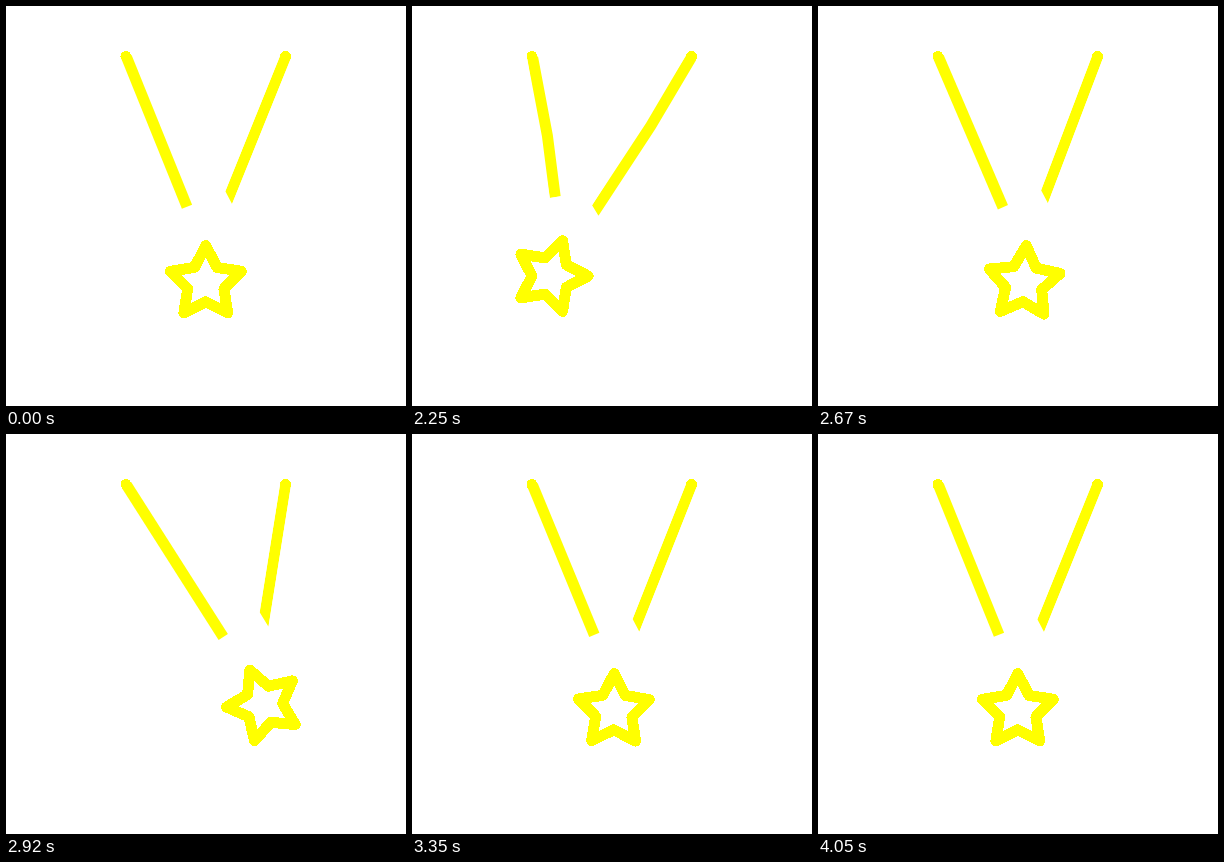
An HTML page without scripts for the animation above (4.1 s loop, 400 px wide and 400 px high).

```html
<!DOCTYPE html>
<html lang="en">
<head>
<meta charset="utf-8">
<title>Swinging medal</title>
<style>
  /* --s: sideways swing, -1 is the left peak; --r: star turn in degrees */
  @property --s { syntax: "<number>"; inherits: true; initial-value: 0; }
  @property --r { syntax: "<number>"; inherits: true; initial-value: 0; }

  html, body { margin: 0; width: 100%; height: 100%; overflow: hidden; background: #fff; }

  .stage {
    position: relative;
    width: 400px;
    height: 400px;
    animation: swing 4.1s cubic-bezier(.47, 0, .53, 1) infinite;
  }
  @keyframes swing {
    0%    { --s: 0; --r: 0; }
    48.8% { --s: 0; --r: 0; animation-timing-function: cubic-bezier(.3, .25, .6, 1); }
    54.9% { --s: -.95; --r: 18; animation-timing-function: linear; }
    61%   { --s: -1; --r: 37; }
    69.1% { --s: 1.1; --r: -27; }
    77.2% { --s: -.41; --r: 14; }
    85.4% { --s: .33; --r: -8.5; }
    98.8%, 100% { --s: 0; --r: 0; }
  }

  .strap, .star { --s2: calc(var(--s) * var(--s)); }

  /* Each strap hangs from its top, turns with the swing and ends at --a and --b */
  .strap {
    --bend: max(0px, -2.2px * var(--s));
    position: absolute;
    left: calc(var(--x) - 10.5px);
    top: 50.5px;
    width: 21px;
    height: 220px;
    background: #ff0;
    transform-origin: 50% 0;
    transform: rotate(calc(var(--tilt) - 12.5deg * var(--s) + var(--pull) * var(--s2)));
    clip-path: polygon(5px 0, 16px 0,
      calc(16px + var(--bend)) 80px, 16px var(--b),
      5px var(--a), calc(5px + var(--bend)) 80px);
  }
  .left {
    --x: 120px; --tilt: -22deg; --pull: 1deg;
    --a: calc(161.5px + 20.6px * var(--s));
    --b: var(--a);
  }
  .right {
    --x: 279.5px; --tilt: 22deg; --pull: -2deg;
    --a: calc(147px - 26px * var(--s) + 7.5px * var(--s2));
    --b: calc(var(--a) + 9.3px + 4px * var(--s));
  }

  svg { position: absolute; left: 0; top: 0; shape-rendering: crispEdges; }
  .star {
    fill: none;
    stroke: #ff0;
    stroke-width: 11;
    stroke-linejoin: round;
    transform: translate(calc(199.8px + 64px * var(--s)), calc(276.8px - 7.5px * var(--s2)))
      rotate(calc(var(--r) * 1deg));
  }
</style>
</head>
<body>
<div class="stage">
  <div class="strap left"></div>
  <div class="strap right"></div>
  <svg width="400" height="400" viewBox="0 0 400 400">
    <g fill="#ff0">
      <circle cx="120" cy="50.5" r="5.5"/>
      <circle cx="279.5" cy="50.5" r="5.5"/>
    </g>
    <path class="star" d="M0-37.2 11.2-15.4 35.4-11.5 18.1 5.9 21.9 30.1 0 19-21.9 30.1-18.1 5.9-35.4-11.5-11.2-15.4Z"/>
  </svg>
</div>
</body>
</html>
```
